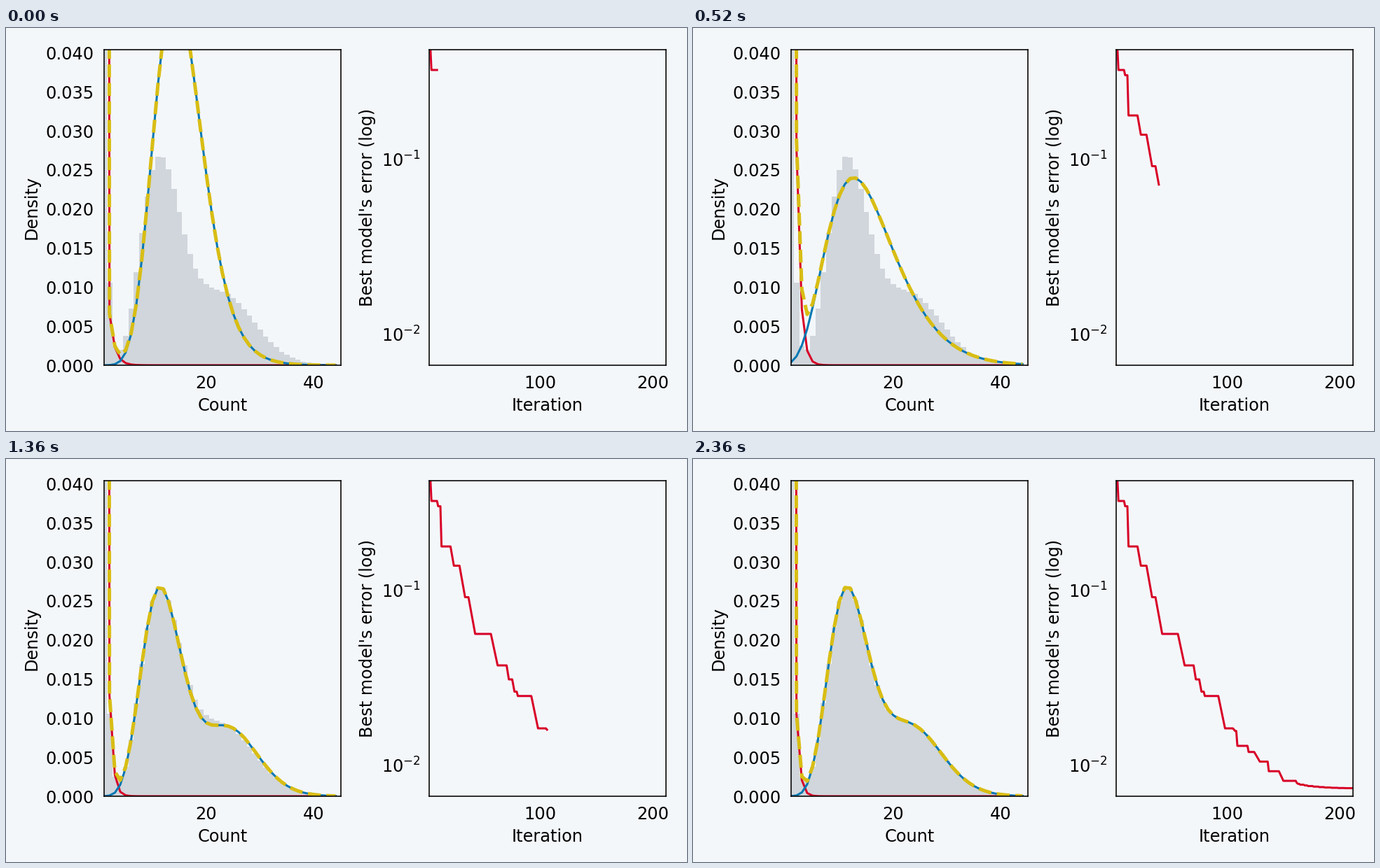
Animation of 972 by 576 pixels, one loop 2.4 s. Source, as a matplotlib script:

```python
import numpy as np
import matplotlib.pyplot as plt
from matplotlib.animation import FuncAnimation

W, H, DPI = 972, 576, 144
FRAMES, INTERVAL = 60, 40
BG, GRAY = "#f4f7fa", "#d0d6db"
RED, BLUE, YELLOW = "#d80027", "#0077b3", "#d8bd14"

plt.rcParams.update({
    "font.family": "DejaVu Sans",
    "font.size": 12,
    "axes.linewidth": 0.8,
    "lines.linewidth": 1.5,
})

COUNTS = np.arange(1, 45)
FIRST_ITER, FIRST_LOSS = 8, 0.49

# Runs of improvement: first and last iteration, -log10(error) reached
RUNS = [
    (9, 9, 0.52), (12, 12, 0.75), (21, 23, 0.86), (29, 33, 1.04),
    (37, 42, 1.25), (57, 62, 1.43), (71, 72, 1.51), (76, 77, 1.58),
    (80, 80, 1.605), (93, 98, 1.79), (106, 107, 1.805), (109, 109, 1.89),
    (119, 119, 1.925), (125, 129, 1.98), (137, 137, 2.035), (147, 150, 2.09),
]

# Key fits: two humps (height, mode, width), then the low part (start, ratio);
# heights are densities times 10,000
KEY_STEPS = [0, 8, 19, 28, 34, 44]
KEY_FITS = np.array([
    (480, 14.2, 4.49, 5, 26.0, 5.0, 66, 0.35),
    (221, 12.8, 7.17, 0, 20.0, 7.0, 362, 0.28),
    (219, 10.8, 3.92, 95, 20.0, 7.0, 184, 0.235),
    (283, 11.2, 3.86, 83, 23.6, 5.6, 138, 0.23),
    (268, 11.4, 3.85, 82, 24.6, 4.9, 129, 0.21),
    (268, 11.4, 3.88, 82, 24.0, 5.1, 105, 0.195),
])


def improvements():
    """Iteration and loss of each new best model, one per frame."""
    iters, losses = [FIRST_ITER], [FIRST_LOSS]
    for first, last, loss in RUNS:
        n = last - first + 1
        losses.extend(np.linspace(losses[-1], loss, n + 1)[1:])
        iters.extend(range(first, last + 1))
    t = np.linspace(0, 1, FRAMES - len(iters))
    iters.extend((162 + 50 * t**1.5).astype(int))
    losses.extend(2.132 - 0.03 * (1 - t)**2)
    return np.array(iters), np.array(losses)


def error_curve():
    """Best error so far at every iteration."""
    iters = np.arange(1, ENDS[-1] + 1)
    best = np.searchsorted(ENDS, iters, side="right") - 1
    loss = LOSS[np.maximum(best, 0)]
    loss[:2] = 0.1, 0.35
    return iters, 10 ** -loss


def hump(height, mode, width):
    """Gamma-shaped hump, its origin moved left to soften the skew."""
    shift = 3
    u = (COUNTS + shift) / (mode + shift)
    k = ((mode + shift) / width)**2
    return height * (u * np.exp(1 - u))**k


def densities(step):
    fit = [np.interp(LOSS[step], LOSS[KEY_STEPS], col) for col in KEY_FITS.T]
    start, ratio = fit[6:]
    low = start * ratio ** (COUNTS - 2.0)
    low[0] = 8000
    main = hump(*fit[:3]) + hump(*fit[3:6])
    return low / 1e4, main / 1e4


def add_axes(left, right, top=31, bottom=482):
    ax = fig.add_axes([left / W, 1 - bottom / H,
                       (right - left) / W, (bottom - top) / H])
    ax.set_facecolor(BG)
    ax.tick_params(length=0, pad=7)
    return ax


ENDS, LOSS = improvements()
ITERS, ERRORS = error_curve()

fig = plt.figure(figsize=(W / DPI, H / DPI), dpi=DPI, facecolor=BG)

ax = add_axes(140, 478)
ax.bar(COUNTS, sum(densities(FRAMES - 1)), width=1, color=GRAY,
       linewidth=0, antialiased=False)
low_line, = ax.plot([], [], color=RED)
main_line, = ax.plot([], [], color=BLUE)
sum_line, = ax.plot([], [], color=YELLOW, linewidth=2.5, linestyle="--")
ax.set(xlim=(1, 45), ylim=(0, 0.0404), xlabel="Count", ylabel="Density",
       xticks=[20, 40], yticks=np.arange(9) * 0.005)
ax.yaxis.set_major_formatter("{x:.3f}")

ax2 = add_axes(604, 942)
error_line, = ax2.plot([], [], color=RED)
ax2.set_yscale("log")
ax2.set(xlim=(1, 212), ylim=(10**-2.178, 10**-0.374), xlabel="Iteration",
        ylabel="Best model's error (log)", xticks=[100, 200],
        yticks=[0.1, 0.01])
ax2.minorticks_off()
ax2.tick_params(axis="y", pad=6)


def update(i):
    low, main = densities(i)
    low_line.set_data(COUNTS, low)
    main_line.set_data(COUNTS, main)
    sum_line.set_data(COUNTS, low + main)
    error_line.set_data(ITERS[:ENDS[i]], ERRORS[:ENDS[i]])
    return low_line, main_line, sum_line, error_line


anim = FuncAnimation(fig, update, frames=FRAMES, interval=INTERVAL,
                     repeat=True, repeat_delay=0)
plt.show()
```
